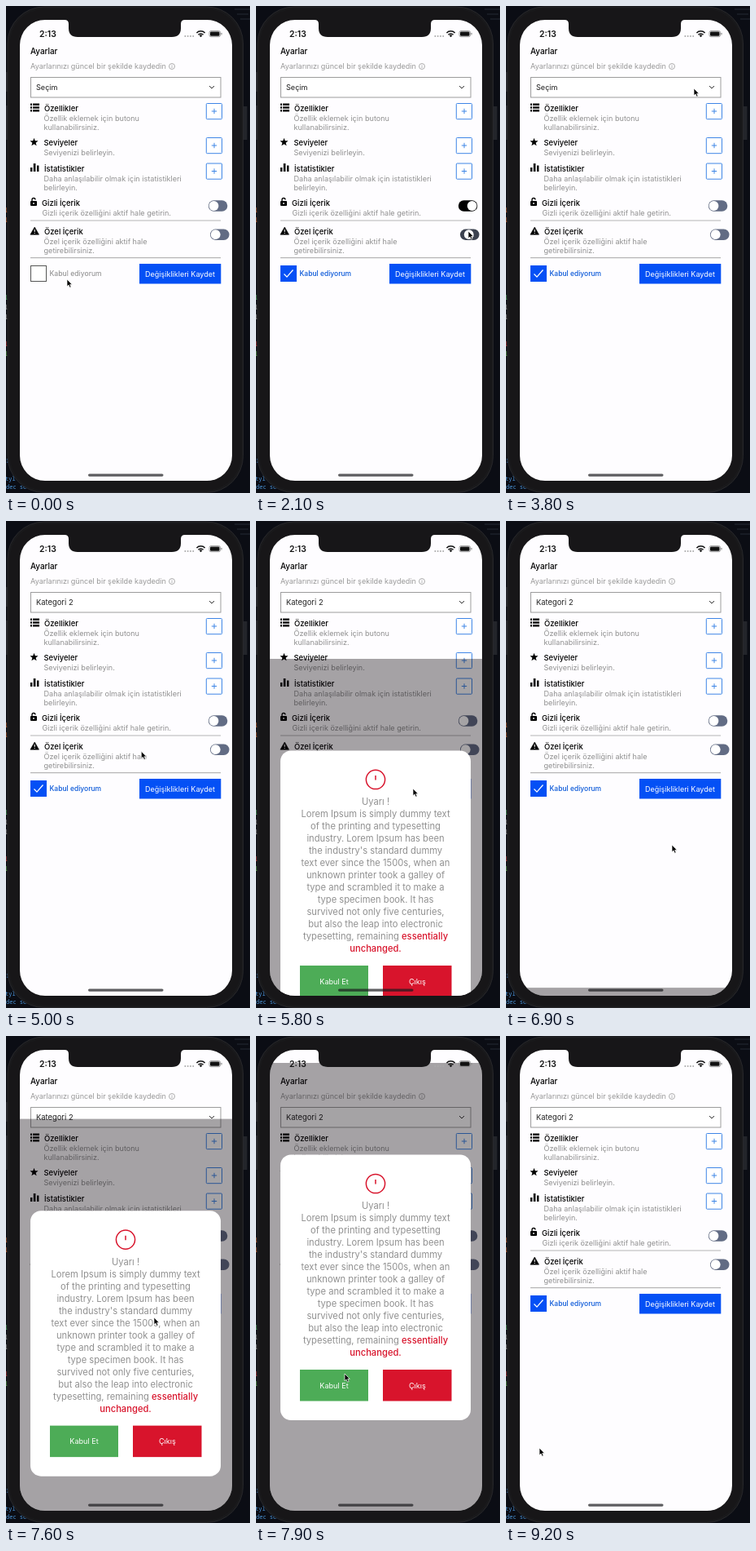
An HTML page for the animation above (9.4 s loop, 300 by 597 pixels).

```html
<!DOCTYPE html>
<html lang="tr">
<head>
<meta charset="utf-8">
<title>Ayarlar</title>
<style>
  html, body { margin: 0; width: 100%; height: 100%; overflow: hidden; background: #0b0d14; }
  svg { display: block; width: 100vw; height: 100vh; }
  text { font-family: Inter, "Open Sans", sans-serif; font-size: 9.1px; fill: #909090; white-space: pre; }
  .head { font-size: 9.45px; font-weight: 500; fill: #000; }
  .body text { font-size: 11.2px; text-anchor: middle; }
  .code { font-family: "Noto Sans Mono", monospace; font-size: 7px; }
  .white { fill: #fff; text-anchor: middle; }
</style>
</head>
<body>
<svg id="stage" viewBox="0 0 300 597" xmlns="http://www.w3.org/2000/svg"></svg>
<script>
const LOOP = 9400, TRAVEL = 549, SLIDE = 500;
const BLUE = '#0450f5', RED = '#d8142c';
const SCREEN = 'M48 17H72q5 0 5 5v5q0 11 11 11H204q11 0 11-11v-5q0-5 5-5H247a31 31 0 0 1 31 31V551a31 31 0 0 1-31 31H48a31 31 0 0 1-31-31V48a31 31 0 0 1 31-31Z';

const rect = (x, y, w, h, fill, more = '') =>
  `<rect x="${x}" y="${y}" width="${w}" height="${h}" fill="${fill}" ${more}/>`;
const line = (d, stroke, width = 1) =>
  `<path d="${d}" fill="none" stroke="${stroke}" stroke-width="${width}"/>`;
const text = (x, y, s, more = '') => `<text x="${x}" y="${y}" ${more}>${s}</text>`;
const head = (x, y, s) => text(x, y, s, 'class="head"');

const plus = y =>
  rect(246.3, y, 19.2, 19.2, '#fff', 'rx="1" stroke="#3f86e6"') +
  line(`M252.8 ${y + 9.5}h6.4M256 ${y + 6.3}v6.4`, '#3f86e6');

const toggle = (id, x, y) => `<g transform="translate(${x} ${y})">
  <rect id="${id}Track" width="23.5" height="13.4" rx="6.7"/>
  <circle id="${id}Knob" cy="6.7" r="5.9" fill="#fff"/></g>`;

function star(cx, cy, r) {
  let pts = '';
  for (let i = 0; i < 10; i++) {
    const a = i * Math.PI / 5, k = i % 2 ? r * 0.42 : r;
    pts += `${cx + k * Math.sin(a)},${cy - k * Math.cos(a)} `;
  }
  return `<polygon points="${pts}"/>`;
}

function backdrop() {
  const code = (y, s, fill, x = -2) => text(x, y, s, `class="code" style="fill:${fill}"`);
  return rect(0, 0, 300, 597, '#0b0d14') +
    rect(0, 81, 3, 24, '#23252b') + rect(0, 122, 3, 42, '#23252b') +
    rect(291, 123, 5.5, 41, '#23252b') +
    line('M281 4H300M284 10H298M288 16H300', '#252a35') +
    code(253, 'l', '#c0622f') + code(265, 'l', '#c0622f') + code(360, 'l', '#4fae62') +
    code(372, 'l', '#999') + code(384, 'l', '#999') + code(417, 'l', '#c43d3d') +
    code(429, 'l', '#5fae4f') + code(560, 'I', '#3f83c9', 0) +
    code(582, 'tyl', '#4b94d8', -1) + code(592, 'dec se', '#4b94d8', 0) +
    rect(2, 1, 289.5, 595.5, '#19191b', 'rx="45" stroke="#28282b"') +
    rect(5, 4, 283.5, 589.5, '#171618', 'rx="42"');
}

function icons() {
  let s = '';
  for (const y of [119.5, 123.3, 127.1])
    s += rect(30, y, 2, 2.4, '#000') + rect(33, y, 8, 2.4, '#000');
  s += star(34.5, 167, 5.3);
  s += rect(30, 198, 2.4, 5, '#000') + rect(33.8, 193, 2.6, 10, '#000') + rect(38, 195.5, 2.4, 7.5, '#000');
  s += rect(30, 239, 8, 6, '#000', 'rx="1"') + line('M32 239.5V237.5a2 2 0 0 1 4 0', '#000', 1.3) +
    '<circle cx="34" cy="242" r=".9" fill="#fff"/>';
  s += '<path d="M35.2 271l5.3 9.2H29.9Z" stroke="#000" stroke-width=".6" stroke-linejoin="round"/>' +
    line('M35.2 274v3M35.2 278v1.1', '#fff', 1.1);
  return s;
}

function page() {
  return rect(17, 17, 261, 565, '#fefdff') +
    text(30, 59, 'Ayarlar', 'class="head" style="font-size:9.9px"') +
    text(30, 77.3, 'Ayarlarınızı güncel bir şekilde kaydedin', 'style="fill:#999"') +
    '<circle cx="204" cy="74" r="3.5" fill="none" stroke="#999" stroke-width=".8"/>' +
    line('M204 72v.8M204 73.5v2.4', '#999', .8) +
    rect(30.5, 87.5, 233.5, 24.5, '#fff', 'stroke="#9c9c9c"') +
    text(37, 103, '', 'id="choice" style="fill:#222"') +
    line('M250 98l3 3 3-3', '#333') +
    icons() +
    head(47, 129, 'Özellikler') +
    text(46.5, 141.3, 'Özellik eklemek için butonu') + text(46.5, 152.3, 'kullanabilirsiniz.') +
    head(46.5, 171.3, 'Seviyeler') + text(46.5, 183.3, 'Seviyenizi belirleyin.') +
    head(47, 202.5, 'İstatistikler') +
    text(46.5, 215, 'Daha anlaşılabilir olmak için istatistikleri') + text(46.5, 226, 'belirleyin.') +
    head(44, 244.7, 'Gizli İçerik') + text(44.5, 257, 'Gizli içerik özelliğini aktif hale getirin.') +
    head(47, 280, 'Özel İçerik') +
    text(46.5, 292.3, 'Özel içerik özelliğini aktif hale') + text(46.5, 303.3, 'getirebilirsiniz.') +
    [119.5, 161.5, 193].map(plus).join('') +
    toggle('one', 248.8, 238.3) + toggle('two', 251, 273.5) +
    line('M30 263H264', '#b4b4b4') + line('M30 308.7H264', '#a4a4a4') +
    '<rect id="box" x="30.5" y="318.5" width="19" height="19"/>' +
    `<g id="tick">${line('M34.5 328.5l3.5 3.7 7.5-8.7', '#fff', 1.2)}</g>` +
    text(53.5, 331.3, 'Kabul ediyorum', 'id="agree"') +
    rect(164, 316, 100.3, 24.5, BLUE) +
    text(214, 331.7, 'Değişiklikleri Kaydet', 'class="white" style="font-size:9px"');
}

function menu() {
  let s = rect(30.5, 112, 233.5, 284.5, '#fff', 'stroke="#9c9c9c"');
  for (let i = 0; i < 10; i++) s += text(37, 130 + i * 28, `Kategori ${i + 1}`, 'style="fill:#222"');
  return `<g id="menu">${s}</g>`;
}

function dialog() {
  const lines = ['Uyarı !', 'Lorem Ipsum is simply dummy text', 'of the printing and typesetting',
    'industry. Lorem Ipsum has been', "the industry's standard dummy", 'text ever since the 1500s, when an',
    'unknown printer took a galley of', 'type and scrambled it to make a', 'type specimen book. It has',
    'survived not only five centuries,', 'but also the leap into electronic',
    `typesetting, remaining <tspan fill="${RED}" font-weight="500">essentially</tspan>`,
    `<tspan fill="${RED}" font-weight="500">unchanged.</tspan>`];
  return `<g id="dialog">
    ${rect(17, 33, 261, 549, '#060008', 'opacity=".36"')}
    ${rect(30, 145.5, 234, 325.5, '#fff', 'rx="13"')}
    <circle cx="147" cy="181" r="11.6" fill="none" stroke="${RED}" stroke-width="1.5"/>
    ${line('M147 176v5.5', RED, 1.5)}
    <g class="body">${lines.map((s, i) => text(147, 212.2 + i * 15, s)).join('')}</g>
    ${rect(54, 409, 84, 38.5, '#4dac57')}${text(96, 431.8, 'Kabul Et', 'class="white"')}
    ${rect(156, 409, 84.5, 38.5, RED)}${text(198.3, 431.8, 'Çıkış', 'class="white"')}
  </g>`;
}

function statusBar() {
  let s = text(41, 37.8, '2:13', 'style="font-size:10.4px;font-weight:600;fill:#111"');
  for (let i = 0; i < 4; i++) s += `<circle cx="${220.3 + i * 3.3}" cy="37" r="1" fill="#aaa"/>`;
  return s + line('M234.4 33a7 7 0 0 1 10.2 0M236.4 35.2a4.3 4.3 0 0 1 6.2 0', '#111', 1.5) +
    '<path d="M237.7 36.2a2.6 2.6 0 0 1 3.6 0l-1.8 2Z" fill="#111"/>' +
    rect(250, 30.5, 13.5, 7.2, 'none', 'rx="2" stroke="#888" stroke-width=".8"') +
    rect(251, 31.5, 11.5, 5.2, '#111', 'rx="1.2"') + rect(264.5, 32.7, 1, 2.8, '#888', 'rx=".5"');
}

document.getElementById('stage').innerHTML =
  `<defs><clipPath id="screen"><path d="${SCREEN}"/></clipPath></defs>` + backdrop() +
  `<g clip-path="url(#screen)">${page()}${menu()}${dialog()}${statusBar()}` +
  rect(101, 573.5, 92.5, 3.2, '#1b1a1d', 'rx="1.6" opacity=".7"') + '</g>' +
  '<path id="cursor" d="M0 0V8.8L2 7l1.5 3.2 1.6-.7L3.7 6.4H6.3Z" fill="#000" stroke="#fff" stroke-width=".7"/>';

const el = id => document.getElementById(id);
const clamp = v => Math.max(0, Math.min(1, v));
const mix = (a, b, p) => a + (b - a) * p;
const smooth = p => p * p * (3 - 2 * p);
const easeOut = p => 1 - (1 - clamp(p)) ** 3;

// time, x, y of the pointer tip
const path = [
  [200, 75, 335], [350, 42, 327], [600, 42, 327], [1000, 100, 424], [1250, 100, 424],
  [1650, 262, 243], [1800, 262, 243], [2050, 261, 276], [2600, 261, 276], [2850, 261, 242],
  [3250, 261, 242], [3800, 231, 101], [4150, 231, 101], [4450, 90, 152], [4600, 90, 152],
  [5200, 193, 328], [6050, 193, 328], [6450, 204, 397], [6950, 204, 397], [7250, 200, 328],
  [7500, 200, 328], [7850, 109, 414], [8300, 109, 414], [9200, 41, 505]
];
// opening and closing times of the dialog
const visits = [[450, 1150], [5614, 6531], [7350, 8300]];

function pointer(t) {
  if (t <= path[0][0]) return path[0].slice(1);
  const i = path.findIndex(k => k[0] >= t);
  if (i < 0) return path[path.length - 1].slice(1);
  const a = path[i - 1], b = path[i], p = smooth((t - a[0]) / (b[0] - a[0]));
  return [mix(a[1], b[1], p), mix(a[2], b[2], p)];
}

function shown(t) {
  let p = 0;
  for (const [open, close] of visits)
    p = Math.max(p, easeOut((t - open) / SLIDE) - easeOut((t - close) / SLIDE));
  return p;
}

function setToggle(id, t, on, off) {
  const p = clamp((t - on) / 200) - clamp((t - off) / 200);
  el(id + 'Knob').setAttribute('cx', mix(6.7, 16.8, p));
  el(id + 'Track').setAttribute('fill', `rgb(${[98, 108, 132].map(c => Math.round(c * (1 - p)))})`);
}

function draw(time) {
  const t = Math.floor(time / 100) * 100;
  const checked = t >= 1250, p = shown(t);
  el('cursor').setAttribute('transform', `translate(${pointer(t)})`);
  el('dialog').setAttribute('transform', `translate(0 ${TRAVEL * (1 - p)})`);
  el('dialog').style.display = p > 0 ? '' : 'none';
  el('menu').style.display = t >= 4000 && t < 4600 ? '' : 'none';
  el('choice').textContent = t < 4600 ? 'Seçim' : 'Kategori 2';
  el('choice').style.fontSize = t < 4600 ? '9.1px' : '9.4px';
  el('box').setAttribute('fill', checked ? BLUE : '#fff');
  el('box').setAttribute('stroke', checked ? BLUE : '#555');
  el('tick').style.display = checked ? '' : 'none';
  el('agree').style.cssText = checked
    ? 'font-size:8.5px;font-weight:500;fill:#0a58d8' : 'font-size:8.7px;fill:#888';
  setToggle('one', t, 1750, 2900);
  setToggle('two', t, 2020, 2500);
}

let start;
function tick(now) {
  start ??= now;
  draw((now - start) % LOOP);
  requestAnimationFrame(tick);
}
draw(0);
requestAnimationFrame(tick);
</script>
</body>
</html>
```
